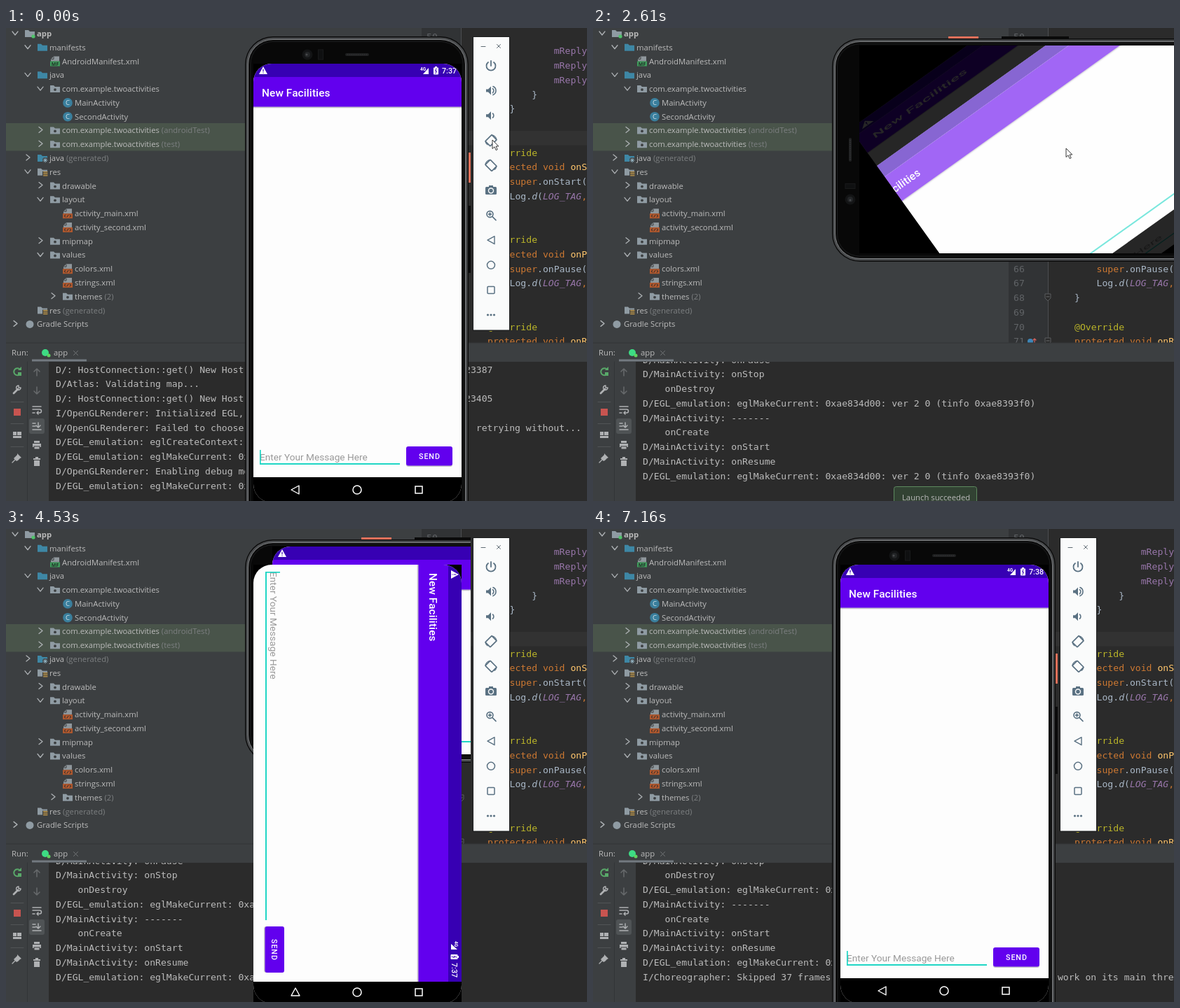
These frames come from a looping animation (829 by 676 pixels, 7.26 s). An HTML page:

```html
<!DOCTYPE html>
<html lang="en">
<head>
<meta charset="utf-8">
<title>Device rotation</title>
<style>
html, body { margin: 0; width: 100%; height: 100%; overflow: hidden; background: #2b2b2b; }
svg { display: block; width: 829px; height: 676px; }
text { white-space: pre; }
.ui { font: 11.3px "Open Sans", "Noto Sans", sans-serif; fill: #bbb; }
.bold { font-weight: 700; }
.mono { font: 13.12px "DejaVu Sans Mono", "Noto Sans Mono", monospace; fill: #a9b7c6; }
.log { fill: #bbb; }
.app { font-family: Roboto, sans-serif; }
.line { fill: none; stroke-linecap: round; stroke-linejoin: round; }
</style>
</head>
<body>
<svg id="stage" viewBox="0 0 829 676">
  <defs>
    <clipPath id="console"><rect x="61" y="477" width="768" height="199"/></clipPath>
    <clipPath id="code"><rect x="593" width="236" height="450"/></clipPath>
    <clipPath id="portClip"><rect x="353" y="51" width="297" height="627" rx="26"/></clipPath>
    <clipPath id="landClip"><rect x="380" y="25" width="627" height="297" rx="26"/></clipPath>
    <clipPath id="oldWindow"><rect width="663" height="676"/></clipPath>
  </defs>
  <g id="ide"></g>
  <g id="log" class="mono log" clip-path="url(#console)"></g>
  <g id="toast">
    <rect x="429.5" y="655.5" width="118" height="40" rx="3" fill="#324233" stroke="#5d8a5f"/>
    <text class="ui" x="441" y="675">Launch succeeded</text>
  </g>
  <g id="scene"></g>
  <g id="bar"></g>
  <path id="cursor" d="M0 0V12.5L3 9.8L5.2 14.6L7.2 13.7L5.1 9H8.8Z" fill="#fff" stroke="#222" stroke-width=".9"/>
</svg>
<script>
const LOOP = 7260;
const $ = id => document.getElementById(id);
const rect = (x, y, w, h, fill, more = '') => `<rect x="${x}" y="${y}" width="${w}" height="${h}" fill="${fill}" ${more}/>`;
const disc = (x, y, r, fill, more = '') => `<circle cx="${x}" cy="${y}" r="${r}" fill="${fill}" ${more}/>`;
const path = (d, color, w = 1.4, more = '') => `<path class="line" d="${d}" stroke="${color}" stroke-width="${w}" ${more}/>`;
const shape = (d, fill) => `<path d="${d}" fill="${fill}"/>`;
const text = (x, y, s, more = '') => `<text x="${x}" y="${y}" ${more}>${s}</text>`;
const span = (color, s, more = '') => `<tspan fill="${color}" ${more}>${s}</tspan>`;
const at = (x, y, body, more = '') => `<g transform="translate(${x} ${y}) ${more}">${body}</g>`;
const mix = (a, b, p) => a + (b - a) * p;

// Project tree: depth, arrow (v open, > closed, - none), icon, label, grey note
const TREE = [
  [0, 'v', 'app', 'app'], [1, 'v', 'blue', 'manifests'], [2, '-', 'mf', 'AndroidManifest.xml'],
  [1, 'v', 'blue', 'java'], [2, 'v', 'dir', 'com.example.twoactivities'],
  [3, '-', 'class', 'MainActivity'], [3, '-', 'class', 'SecondActivity'],
  [2, '>', 'dir', 'com.example.twoactivities', 'androidTest'], [2, '>', 'dir', 'com.example.twoactivities', 'test'],
  [1, '>', 'gen', 'java', 'generated'], [1, 'v', 'res', 'res'], [2, '>', 'dir', 'drawable'], [2, 'v', 'dir', 'layout'],
  [3, '-', 'xml', 'activity_main.xml'], [3, '-', 'xml', 'activity_second.xml'], [2, '>', 'dir', 'mipmap'],
  [2, 'v', 'dir', 'values'], [3, '-', 'xml', 'colors.xml'], [3, '-', 'xml', 'strings.xml'],
  [3, '>', 'dir', 'themes', '2'], [1, '-', 'res', 'res', 'generated'], [0, '>', 'build', 'Gradle Scripts']
];
const folder = color => shape('M-7-5H-2L0-3H7V5H-7Z', color);
const doc = (color, label) => shape('M-2-7H6V0H-6V-3Z', '#8f979c') + path('M-5-3H-2V-6', '#3c3f41', 1) + rect(-7, 0, 14, 7, color) + label;
const ICONS = {
  app: folder('#8f9ba3') + disc(5, 4, 2.6, '#4fc36a'),
  blue: folder('#3e87a5'),
  dir: folder('#8f9ba3') + disc(0, 1, 1.9, '#3c3f41'),
  gen: folder('#3e87a5') + disc(4, 3, 4, '#3c3f41') + path('M4 0V6M1 3H7M2 1L6 5M6 1L2 5', '#9ec0d0', .9),
  res: folder('#8f9ba3') + rect(0, -1, 8, 8, '#3c3f41') + path('M1.5 0H7M1.5 2.5H7M1.5 5H7', '#d0a24a', 1.3),
  class: disc(0, 0, 6.8, '#3a7f9d') + text(0, 3.5, 'C', 'class="ui" text-anchor="middle" style="font-size:9.5px;fill:#d5e2e8"'),
  xml: doc('#b0582e', path('M-3 2L-5 3.5L-3 5M3 2L5 3.5L3 5M1 2L-1 5', '#2b2b2b', 1)),
  mf: doc('#3f9c5c', text(0, 6, 'MF', 'class="ui bold" text-anchor="middle" style="font-size:7px;fill:#23302a"')),
  build: disc(0, 0, 5.5, '#8f9ba3')
};

function tree() {
  return rect(0, 136, 593, 39.5, '#49544a') + TREE.map(([depth, arrow, icon, label, note], i) => {
    const x = 44 + 18 * depth, y = 8 + 19.78 * i;
    const mark = arrow == 'v' ? 'M-4-3L0 2L4-3' : arrow == '>' ? 'M-2-5L3-1L-2 3' : '';
    const name = label + (note ? span('#7c7f80', ` (${note})`) : '');
    return (mark && at(x - 31, y, path(mark, '#aeb2b5', 1.3))) + at(x - 10, y, ICONS[icon]) +
      text(x, y + 4, name, `class="ui ${i ? '' : 'bold'}"`);
  }).join('');
}

const italic = (color, s) => span(color, s, 'font-style="italic"');
const method = name => [
  span('#bbb529', '@Override'),
  span('#cc7832', 'protected void ') + span('#ffc66d', name) + '() {',
  `    ${span('#cc7832', 'super')}.${name}();`,
  `    Log.${italic('#a9b7c6', 'd')}(${italic('#9876aa', 'LOG_TAG')}${span('#cc7832', ',')} ${span('#6a8759', `"${name}"`)});`,
  '}', ''
];

function editor() {
  const reply = '            ' + span('#9876aa', 'mReply');
  const rows = ['', reply, reply, reply, '        }', '    }', '', '', ...method('onStart'), ...method('onPause'), ...method('onResume')];
  const body = rows.slice(0, 22).map((row, i) => {
    const y = 12 + 20.75 * i + 4.7;
    return text(600, y, 50 + i, 'style="fill:#606366"') + text(687, y, row);
  }).join('');
  const fold = y => `<path d="M645 ${y - 5}H653V${y + 1}L649 ${y + 5}L645 ${y + 1}Z" fill="#2b2b2b" stroke="#5a5d5f"/>` + path(`M647 ${y - 1}H651`, '#6a6d6f', 1);
  return `<g class="mono" clip-path="url(#code)">` + rect(593, 0, 236, 450, '#2b2b2b') + rect(593, 0, 56, 450, '#313335') +
    rect(593, 147, 236, 20.5, '#323232') + path('M649.5 0V450', '#4b4e50', 1) + body + fold(385) + fold(448) +
    disc(624, 448, 4, '#3d86b8') + path('M630 452V444M628 446L630 444L632 446', '#d2605a', 1.2) + '</g>';
}

function runPanel() {
  const ink = '#afb1b3', dim = '#66696b';
  return rect(0, 450, 829, 27, '#3c3f41') + rect(0, 477, 61, 199, '#3c3f41') + rect(61, 477, 768, 199, '#2b2b2b') +
    path('M0 450H829M30.5 477V676', '#323537', 1) +
    text(8, 468, 'Run:', 'class="ui"') + disc(56, 464, 5, '#3ddc84') + disc(61, 468, 2.5, '#5fd35f') +
    text(68, 468, 'app', 'class="ui"') + path('M96.5 461.5L102.5 467.5M102.5 461.5L96.5 467.5', '#737678', 1) + rect(37, 473.5, 78, 3, '#737a80') +
    at(16, 491, path('M4-3A5 5 0 1 0 5 2', '#59a869', 2) + shape('M1-2H6V-7Z', '#59a869') + rect(1, 1, 5, 5, '#59a869')) +
    at(16, 517, path('M-5 5L1-1', ink, 2.8) + path('M5-3A3.2 3.2 0 1 1 2-6L2-3Z', ink, 1.5)) +
    rect(11, 544, 10, 10, '#c75450') +
    at(16, 581, rect(-6, -4, 5, 5, ink) + rect(0, -4, 6, 5, ink) + rect(-6, 2, 12, 3, ink)) +
    at(16, 614, shape('M0-6L6 0L4 1L1 4L-1 5L-5 1L-3-1L0-4Z', ink) + path('M-3 3L-7 7', ink, 1.3)) +
    path('M7 534.5H25M7 565.5H25M7 598.5H25', '#515456', 1) +
    at(44, 492, path('M0 5V-5M-4-1L0-5L4-1', dim, 1.6)) + at(44, 518, path('M0-5V5M-4 1L0 5L4 1', dim, 1.6)) +
    at(44, 545, path('M-6-4H6M-6 0H4A2.5 2.5 0 0 1 4 5H0M2 3L0 5L2 7M-6 5H-3', ink, 1.5)) +
    rect(33, 558, 22, 22, '#4f5355', 'rx="3"') +
    at(44, 569, path('M-6 5H6M-6-4H-2M-6 0H-2M2-5V2M-1-1L2 2L5-1', ink, 1.5)) +
    at(44, 596, rect(-4, -6, 8, 3, ink) + rect(-6, -2, 12, 5, ink) + rect(-4, 2, 8, 4, ink, 'stroke="#3c3f41"')) +
    at(44, 620, rect(-5, -5, 10, 2, ink) + rect(-2, -7, 4, 2, ink) + rect(-4, -2, 8, 8, ink));
}

const TAG = 'D/MainActivity: ';
const CURRENT = 'D/EGL_emulation: eglMakeCurrent: 0xae834d00: ver 2 0 (tinfo 0xae8393f0)';
const RESTART = [TAG + 'onPause', TAG + 'onStop', '    onDestroy', CURRENT, TAG + '-------', '    onCreate', TAG + 'onStart', TAG + 'onResume', CURRENT];
const HOST = 'D/: HostConnection::get() New Host Connection established 0xe3a9a7d0, tid ';
const LOG = [
  HOST + '23387', 'D/Atlas: Validating map...', HOST + '23405', 'I/OpenGLRenderer: Initialized EGL, version 1.4',
  'W/OpenGLRenderer: Failed to choose config with EGL_SWAP_BEHAVIOR_PRESERVED, retrying without...',
  'D/EGL_emulation: eglCreateContext: 0xae834d00: maj 2 min 0 rcv 2', CURRENT,
  'D/OpenGLRenderer: Enabling debug mode 0', CURRENT, ...RESTART, ...RESTART,
  'I/Choreographer: Skipped 37 frames!  The application may be doing too much work on its main thread.'
];
function log(count) {
  const last = count == 9 ? 654 : 640;
  return LOG.slice(Math.max(0, count - 9), count).reverse()
    .map((row, i) => text(71, last - 20.75 * i + 4.7, row)).join('');
}

function toolbar(hover) {
  const ink = '#5a7182';
  const speaker = shape('M-7-2H-4L0-6V6L-4 2H-7Z', ink);
  const turn = rect(-5, -6.5, 10, 13, 'none', `transform="rotate(-45)" stroke="${ink}" stroke-width="1.7" rx="1"`) + path('M-8-1A8 8 0 0 1-1-8M8 1A8 8 0 0 1 5 6', ink, 1.3);
  const icons = [
    path('M-4-5A6.5 6.5 0 1 0 4-5M0-7V0', ink, 1.8),
    speaker + path('M2.5-3A4 4 0 0 1 2.5 3M3-6A6.5 6.5 0 0 1 3 6', ink, 1.6),
    speaker + path('M2.5-3A4 4 0 0 1 2.5 3', ink, 1.6),
    `<g transform="scale(-1 1)">${turn}</g>`, turn,
    rect(-8, -5, 16, 11, ink, 'rx="1.5"') + rect(-3, -7, 6, 3, ink) + disc(0, .5, 3.5, ink, 'stroke="#fafbfb" stroke-width="1.4"'),
    disc(-1.5, -1.5, 4.5, 'none', `stroke="${ink}" stroke-width="1.6"`) + path('M2 2L7 7M-3.5-1.5H.5M-1.5-3.5V.5', ink, 1.6),
    path('M5-5.5V5.5L-5 0Z', ink), disc(0, 0, 5.5, 'none', `stroke="${ink}" stroke-width="1.5"`),
    rect(-5, -5, 10, 10, 'none', `stroke="${ink}" stroke-width="1.5" rx="1"`),
    [-4.5, 0, 4.5].map(x => disc(x, 0, 1.6, ink)).join('')
  ];
  return rect(666, 12, 53, 421, '#1d1e1f') + rect(667, 13, 51, 418.5, '#fafbfb') +
    path('M678 26.5H684M700.5 23.5L705.5 28.5M705.5 23.5L700.5 28.5', '#5f6b73', 1) +
    (hover ? rect(671, 165, 33, 14, '#ececec') : '') +
    icons.map((icon, i) => at(692, 54 + 35.6 * i, icon)).join('');
}

// Device body, portrait coordinates
const BODY = rect(660, 178, 3, 43, '#e2705a') + rect(660, 254, 3, 96, '#0a0a0a') +
  rect(341, 12, 319, 760, '#0b0b0b', 'rx="40"') +
  rect(344, 15, 313, 760, '#0b0b0b', 'rx="37" stroke="#4b4d4f" stroke-width="3"') +
  rect(345.5, 16.5, 310, 760, 'none', 'rx="35.5" stroke="#7f8183"') +
  rect(349, 19.5, 303, 760, '#080808', 'rx="32" stroke="#1b1c1d"') +
  disc(430, 38, 7.5, '#131415') + disc(430, 38, 4, '#232527') + disc(429, 38, 1.5, '#47494c') +
  rect(445.5, 31, 7, 14, '#0f1011', 'stroke="#18191a"') +
  rect(484, 36, 34, 4, '#1f2021', 'rx="2"') + path('M487 38H515', '#38393b', 1.2, 'stroke-dasharray="1 2"');
const LYING = `<g transform="matrix(0 -1 1 0 329 675)">${BODY}</g>`;

function content(land, caret, clock) {
  const w = land ? 627 : 297, h = land ? 297 : 627;
  const view = land ? 596 : 297, end = land ? 300 : 0;
  const y = land ? 279 : 572, x = land ? 10 : 9, right = land ? 508 : 209;
  const [bx, by] = land ? [517, 253] : [218, 547];
  const nav = [
    [60, path('M5-6V6L-6 0Z', '#fff')],
    [148, disc(0, 0, 6, 'none', 'stroke="#fff" stroke-width="1.5"')],
    [236, rect(-5, -5, 10, 10, 'none', 'stroke="#fff" stroke-width="1.5"')]
  ];
  return '<g class="app">' + rect(0, 0, w, h, '#fdfdfd') + rect(0, 61, view, 2, '#c4c0cc') + rect(0, 63, view, 1, '#ededef') +
    rect(0, 0, view, 19, '#3700b3') + rect(0, 19, view, 42.5, '#6200ee') +
    shape('M14 4L20 15H8Z', '#fff') + path('M14 8V11M14 13V13.2', '#3700b3', 1.2) +
    text(238 + end, 10, '4G', 'font-size="6.5" font-weight="700" fill="#fff"') +
    shape(`M${242 + end} 15H${250 + end}V6Z`, '#fff') +
    rect(257 + end, 5.5, 7, 10, '#fff', 'rx="1"') + rect(259 + end, 4, 3, 2, '#fff') + path(`M${261 + end} 7L${259.5 + end} 10.5H${261.5 + end}L${260 + end} 14`, '#3700b3', 1) +
    text(269 + end, 14, clock, 'font-size="10.75" font-weight="500" fill="#fff"') +
    text(12, 46.5, 'New Facilities', 'font-size="15.4" font-weight="500" letter-spacing=".1" fill="#fff"') +
    text(x, y - 5.5, 'Enter Your Message Here', 'font-size="13.65" fill="#999"') +
    rect(x, y - 1, right - x, 2, '#1fd6c5') + (caret ? rect(x, y - 20, 1.7, 19, '#1fd6c5') : '') +
    rect(bx, by + 1, 66, 28, '#c9c9cc', 'rx="3"') + rect(bx, by, 66, 27.5, '#6200ee', 'rx="3"') +
    text(bx + 18, by + 17.7, 'SEND', 'font-size="10.75" font-weight="500" letter-spacing=".9" fill="#fff"') +
    (land ? rect(596, 0, 31, 297, '#000') : rect(0, 591, 297, 36, '#000')) +
    nav.map(([p, icon]) => land ? at(611, 297 - p, icon) : at(p, 609, icon)).join('') + '</g>';
}

// Screen turning between orientations: the former picture stretches while the next one is revealed
function spin(land, [p, ghost, veil], clock) {
  const [w, h] = land ? [627, 297] : [297, 627];
  const cw = mix(h, w, p), ch = mix(w, h, p);
  return at(land ? 693.5 : 501.5, land ? 173.5 : 364.5,
    `<clipPath id="reveal"><rect x="${-cw / 2}" y="${-ch / 2}" width="${cw}" height="${ch}"/></clipPath>` +
    `<g opacity="${ghost}" transform="scale(${mix(1, w / h, p)} ${mix(1, h / w, p)})">${at(-h / 2, -w / 2, content(!land, 0, '7:37'))}</g>` +
    `<g clip-path="url(#reveal)" opacity="${1 - ghost ** 4}">${at(-w / 2, -h / 2, content(land, 0, clock))}` +
    rect(-w / 2, -h / 2, w, h, '#fff', `opacity="${veil}"`) + '</g>',
    `rotate(${(land ? -90 : 90) * (1 - p)})`);
}

function scene({ view, caret, clock, turn }) {
  const upright = body => rect(353, 51, 297, 627, '#000') + `<g clip-path="url(#portClip)">${body}</g>`;
  const lying = body => rect(380, 25, 627, 297, '#000') + `<g clip-path="url(#landClip)">${body}</g>`;
  const wide = () => at(380, 25, content(true, caret, clock));
  const side = () => at(650, 51, content(true, caret, clock), 'rotate(90)');
  switch (view) {
    case 'port': return BODY + upright(at(353, 51, content(false, caret, clock)));
    case 'toLand': return LYING + lying(spin(true, turn, clock));
    case 'land': return LYING + lying(wide());
    case 'swap': return `<g clip-path="url(#oldWindow)">${LYING}${lying(wide())}</g>` + upright(side());
    case 'side': return BODY + upright(side());
    case 'toPort': return BODY + upright(spin(false, turn, clock));
  }
  return '';
}

const STEPS = [
  [0, { view: 'port', caret: 1, clock: '7:37', rows: 9, cur: [694, 160], bar: 1, hover: 0 }],
  [530, { caret: 0 }], [990, { caret: 1 }], [1500, { caret: 0 }], [1640, { caret: 1 }],
  [1790, { cur: [690, 162], rows: 12, hover: 1 }], [1910, { cur: [677, 167], rows: 14 }],
  [2030, { cur: [662, 168], rows: 16 }], [2180, { cur: [664, 167], rows: 18 }], [2330, { cur: [667, 172] }],
  [2470, { view: 'none', cur: [671, 172], bar: 0, hover: 0 }],
  [2610, { view: 'toLand', turn: [.605, .15, .4], cur: [675, 172] }],
  [2750, { turn: [.93, .04, .2] }], [2880, { turn: [1, 0, .06] }], [3020, { view: 'land', caret: 0 }],
  [3430, { caret: 1, cur: [788, 122] }], [3570, { cur: null }], [3950, { caret: 0 }],
  [4530, { view: 'swap', caret: 1, bar: 1 }], [4650, { view: 'side' }], [4930, { caret: 0 }],
  [5330, { cur: [820, 348] }], [5480, { cur: [765, 400], rows: 21 }], [5600, { cur: [695, 474], rows: 24 }],
  [5720, { cur: [653, 518], rows: 27 }], [5860, { cur: [649, 521] }],
  [6180, { view: 'toPort', turn: [.12, .85, .75], clock: '7:38', cur: [736, 590] }],
  [6330, { turn: [.62, .15, .4], rows: 28, cur: null }], [6460, { turn: [.96, .03, .14] }],
  [6590, { view: 'port', caret: 0 }], [7160, { caret: 1 }]
];
let last = {};
const states = STEPS.map(([time, change]) => [time, last = { ...last, ...change }]);

$('ide').innerHTML = rect(0, 0, 593, 450, '#3c3f41') + tree() + editor() + runPanel();

let shown;
function show(now) {
  const t = now % LOOP;
  const state = states.findLast(([time]) => time <= t)[1];
  if (state !== shown) {
    $('scene').innerHTML = scene(state);
    $('log').innerHTML = log(state.rows);
    $('bar').innerHTML = state.bar ? toolbar(state.hover) : '';
    $('cursor').setAttribute('transform', `translate(${state.cur || [-50, -50]})`);
    shown = state;
  }
}
const start = performance.now();
const tick = () => { show(performance.now() - start); requestAnimationFrame(tick); };
tick();
</script>
</body>
</html>
```
